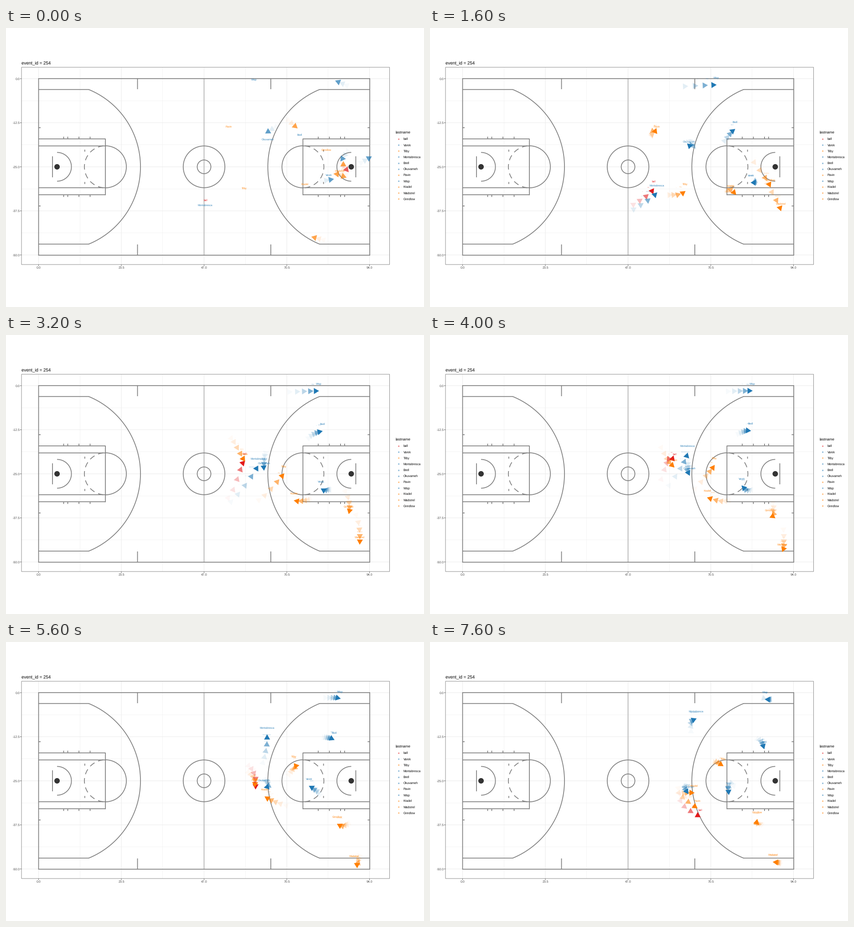
A matplotlib script that plays this animation: 917 by 611 pixels, repeating every 8 s.

```python
import numpy as np
import matplotlib.pyplot as plt
from matplotlib.animation import FuncAnimation
from matplotlib.patches import Circle, Polygon, Rectangle

W, H, DPI = 917, 611, 100
FRAMES, INTERVAL = 20, 400
PT = 72 / DPI  # points per pixel
BLUE, ORANGE, RED = "#1F78B4", "#FF7F00", "#E31A1C"
COURT = "#7f7f7f"
MID_Y, HOOP_X, KEY_X = 304, 112, 218
LABEL_GAP, ARROW_GAP, ARROW_R = 15.5, 6.8, 7.6
LABEL_SIZE = 5.6
WAKE = [(1 - lag / 6) ** 3 for lag in range(5)]
KEY_STEP = 4  # frames between the key points of a path
TRAIL_STEP = 10

plt.rcParams.update({"font.family": "Liberation Sans", "path.snap": False,
                     "text.hinting": "none"})
fig = plt.figure(figsize=(W / DPI, H / DPI), dpi=DPI, facecolor="white")
ax = fig.add_axes([0, 0, 1, 1])
ax.set(xlim=(0, W), ylim=(H, 0))
ax.axis("off")


def line(x0, y0, x1, y1, color=COURT, width=1.7, z=2):
    ax.plot([x0, x1], [y0, y1], color=color, lw=width * PT, zorder=z,
            solid_capstyle="butt")


def text(x, y, s, size, color="black", ha="left", z=4, **kw):
    return ax.text(x, y + 0.36 * size, s, fontsize=size * PT, color=color,
                   ha=ha, va="baseline", zorder=z, **kw)


def box(x0, y0, x1, y1, color=COURT, width=1.7):
    ax.add_patch(Rectangle((x0, y0), x1 - x0, y1 - y0, fill=False, ec=color,
                           lw=width * PT, zorder=2))


def draw_panel():
    for i, (x, y) in enumerate(zip(np.linspace(71.5, 797.5, 9),
                                   np.linspace(111, 497, 9))):
        major = i % 2 == 0
        width = 1 if major else 0.5
        line(x, 86, x, 518, "#ebebeb", width, 0)
        line(34, y, 841.5, y, "#ebebeb", width, 0)
        if major:
            line(x, 518, x, 521, "#333333", 0.8)
            line(31, y, 34, y, "#333333", 0.8)
            text(x, 524.5, f"{11.75 * i:.1f}", 7, "#4d4d4d", "center")
            text(30.5, y, f"{0 - 6.25 * i:.1f}", 7, "#4d4d4d", "right")
    box(34, 86, 841.5, 518, "#8c8c8c", 1)
    text(33.5, 76, "event_id = 254", 9.8)


def draw_half(mirror):
    def fx(x):
        return 869.4 - x if mirror else x

    def seg(x0, y0, x1, y1):
        line(fx(x0), y0, fx(x1), y1)

    def arc(x, r, start, end):
        a = np.radians(np.linspace(start, end, 90))
        ax.plot(fx(x + r * np.cos(a)), MID_Y + r * np.sin(a), color=COURT,
                lw=1.7 * PT, zorder=2, solid_capstyle="butt")

    arc(HOOP_X, 183, -67.8, 67.8)
    arc(HOOP_X, 31.5, -90, 90)
    arc(KEY_X, 46, -90, 90)
    for k in range(7):
        middle = 90 + (k + 0.5) * 180 / 7
        arc(KEY_X, 46, middle - 7.5, middle + 7.5)
    ax.add_patch(Circle((fx(HOOP_X), MID_Y), 6, fc="#333333", ec="none",
                        zorder=2))
    seg(102, 281, 102, 327)
    seg(KEY_X, 242.3, KEY_X, 366.2)
    for side in (-1, 1):
        def edge(dy):
            return MID_Y + side * dy
        for dy, end in ((169.3, 181.5), (61.2, KEY_X), (45.7, KEY_X),
                        (85.7, 76)):
            seg(71.5, edge(dy), end, edge(dy))
        seg(288.5, edge(193), 288.5, edge(170))
        seg(172.8, edge(33.2), 172.8, edge(37.6))
        for x in (126.5, 135.5, 160, 184.5):
            seg(x, edge(62), x, edge(66))


def draw_court():
    draw_half(False)
    draw_half(True)
    line(434.5, 111, 434.5, 497.5, "#bebebe", 2.1)
    for r in (45.7, 15):
        ax.add_patch(Circle((434.5, MID_Y), r, fill=False, ec=COURT,
                            lw=1.7 * PT, zorder=2))
    box(71.5, 110.8, 798, 497.6)


def unit(angle):
    return np.array([np.cos(angle), np.sin(angle)])


class Runner:
    """A label and arrow on a smooth path, each with a fading wake.

    `last` is where the previous play ended: x, y and heading in degrees.
    """

    def __init__(self, name, color, path, last):
        self.name, self.color, self.last = name, color, last
        self.path = np.array(path, float)
        self.slope = np.gradient(self.path, axis=0)
        self.arrows, self.labels = [], []
        for lag, fade in enumerate(WAKE):
            z = 3 - lag * 0.1
            self.arrows.append(ax.add_patch(Polygon(
                np.zeros((3, 2)), fc=color, ec="none", alpha=fade, zorder=z)))
            self.labels.append(text(0, 0, name, LABEL_SIZE * fade, color,
                                    "center", z + 1, alpha=0.9 * fade))

    def at(self, frame):
        """Label position: cubic through evenly timed key points."""
        t = frame / KEY_STEP
        i = int(np.clip(t, 0, len(self.path) - 2))
        u = t - i
        return ((1 + 2 * u) * (1 - u) ** 2 * self.path[i]
                + u * (1 - u) ** 2 * self.slope[i]
                + u * u * (3 - 2 * u) * self.path[i + 1]
                + u * u * (u - 1) * self.slope[i + 1])

    def pose(self, n):
        """Arrow centre and heading; steps before zero end the last play."""
        if n < 0:
            x, y, degrees = self.last
            angle = np.radians(-degrees)
            back = TRAIL_STEP * max(0, -n - 2)
            return (x, y) - back * unit(angle), angle
        dx, dy = self.at(n + 0.25) - self.at(n - 0.25)
        angle = np.arctan2(dy, dx)
        return self.at(n) + (0, LABEL_GAP) - ARROW_GAP * unit(angle), angle

    def update(self, frame):
        for lag, (arrow, label) in enumerate(zip(self.arrows, self.labels)):
            n = frame - lag
            arrow.set_visible(n != 0)
            label.set_visible(n >= 0)
            centre, angle = self.pose(n)
            arrow.set_xy([centre + ARROW_R * unit(angle + k * 2 * np.pi / 3)
                          for k in range(3)])
            x, y = self.at(max(n, 0))
            label.set_position((x, y + 0.36 * LABEL_SIZE * WAKE[lag]))


ball = Runner("ball", RED, [(438, 377), (491, 336), (524, 260), (546, 278),
                            (553, 338), (608, 377)], (747, 310, 310))
varek = Runner("Varek", BLUE, [(708, 322), (704, 323), (691, 321), (676, 307),
                               (656, 298), (656, 327)], (712, 332, 10))
tilby = Runner("Tilby", ORANGE, [(523, 351), (560, 342), (610, 288),
                                 (632, 257), (631, 249), (648, 259)],
               (677, 459, 165))
montabresca = Runner("Montabresca", BLUE, [(437, 388), (498, 345), (553, 271),
                                           (571, 217), (574, 163), (588, 150)],
                     (796, 285, 30))
brell = Runner("Brell", BLUE, [(644, 234), (669, 206), (694, 195), (712, 196),
                               (727, 204), (735, 224)], (738, 286, 235))
okuvameh = Runner("Okuvameh", BLUE, [(574, 244), (568, 249), (566, 281),
                                     (572, 300), (561, 306), (569, 321)],
                  (575, 227, 212))
pavin = Runner("Pavin", ORANGE, [(489, 216), (498, 216), (524, 261),
                                 (545, 286), (550, 320), (600, 358)],
               (634, 215, 320))
wisp = Runner("Wisp", BLUE, [(544, 113), (628, 109), (686, 107), (723, 107),
                             (739, 110), (733, 110)], (729, 118, 158))
kradel = Runner("Kradel", ORANGE, [(656, 342), (660, 346), (632, 347),
                                   (585, 332), (560, 316), (588, 315)],
                (726, 320, 175))
wadstrel = Runner("Wadstrel", ORANGE, [(733, 313), (770, 385), (776, 443),
                                       (768, 468), (760, 467), (750, 466)],
                  (740, 325, 340))
grindlow = Runner("Grindlow", ORANGE, [(703, 267), (747, 333), (752, 376),
                                       (736, 386), (719, 378), (718, 371)],
                  (740, 299, 90))
runners = [ball, varek, tilby, montabresca, brell, okuvameh, pavin, wisp,
           kradel, wadstrel, grindlow]


def draw_legend():
    text(854, 228, "lastname", 8.1)
    dashed = (varek, tilby, kradel, wadstrel)
    for i, runner in enumerate(runners):
        y = 243 + 13.13 * i
        text(861.3, y, "a", 5.6, runner.color, "center", alpha=0.75,
             weight="bold")
        if runner in dashed:
            text(866.5, y, "-", 5, runner.color, "center", alpha=0.6)
        text(871.7, y, runner.name, 6.6)


def update(frame):
    for runner in runners:
        runner.update(frame)
    return []


draw_panel()
draw_court()
draw_legend()
anim = FuncAnimation(fig, update, frames=FRAMES, interval=INTERVAL,
                     init_func=lambda: update(0), repeat=True, repeat_delay=0,
                     blit=False)
plt.show()
```
